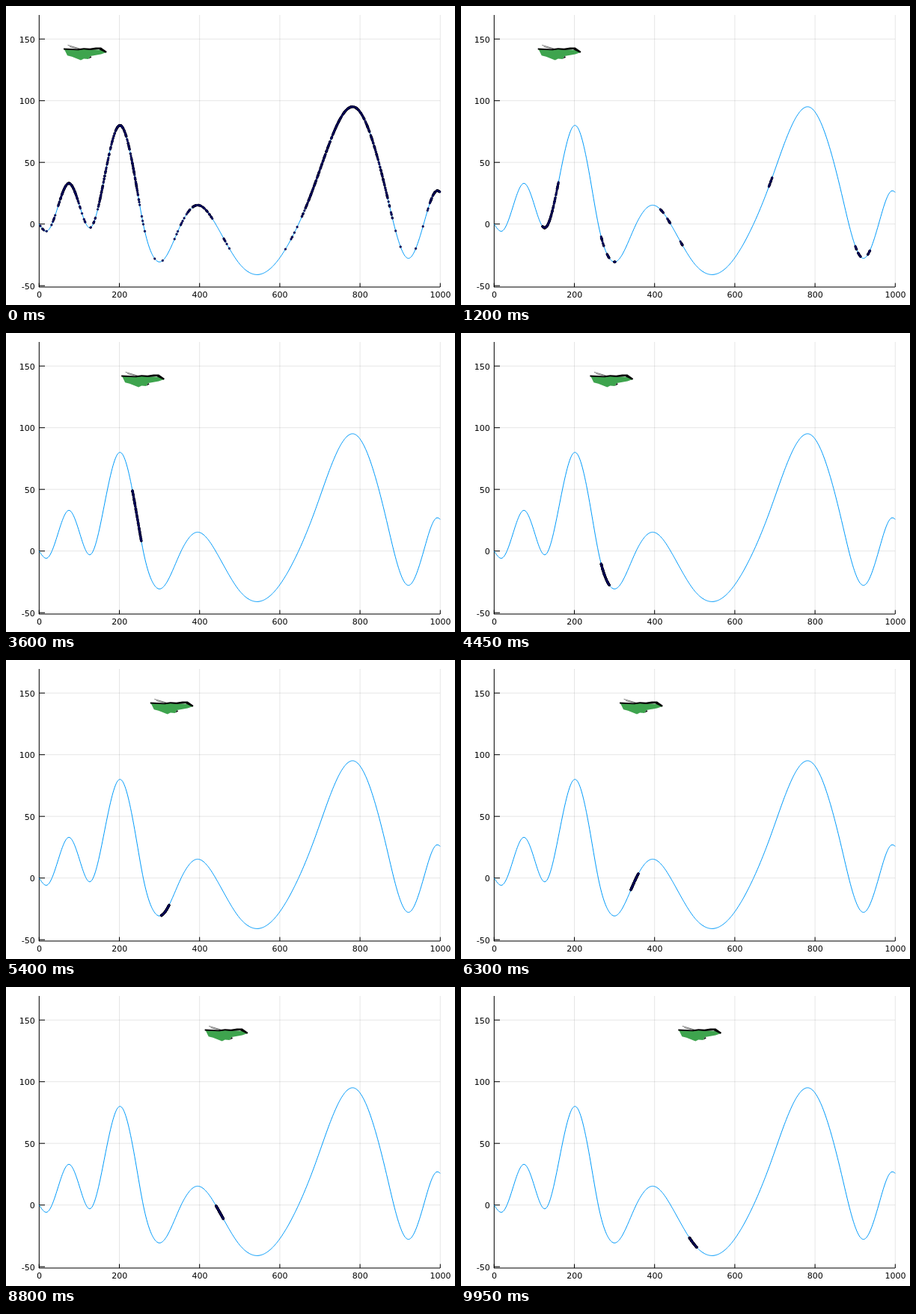
An HTML page for the animation above (10000 ms loop, 600x400 px).

```html
<!DOCTYPE html>
<html lang="en">
<head>
<meta charset="utf-8">
<title>Terrain localisation</title>
<style>
html, body { margin: 0; width: 100%; height: 100%; overflow: hidden; background: #fff; }
svg { display: block; width: 600px; height: 400px; }
text { font: 11px "DejaVu Sans", sans-serif; fill: #000; }
</style>
</head>
<body>
<svg viewBox="0 0 600 400">
  <g id="grid" stroke="#000" stroke-opacity=".1"></g>
  <g id="axes" stroke="#000"></g>
  <g id="labels"></g>
  <path id="ground" fill="none" stroke="#009afa"/>
  <g id="dots" fill="#000080" stroke="#000" stroke-width=".45"></g>
  <g id="plane">
    <path fill="#3ea44e" d="M78 58L112 58L130 59L134 62L127 64.5L113 67L110 71L104 70.4L100 72.5L88 67.7L82 66.3Z"/>
    <path d="M77 56.6L95 57.4L104 56.2L112 56.8L120 55.4L127 55.6L134.8 61L133.5 62.8L124 58L112 59L104 58.2L97 59.2L77 58.6Z"/>
    <path d="M113 67L114.4 68.5L110.5 70.8Z"/>
    <path fill="none" stroke="#222" stroke-width=".6" d="M82.5 52.3L99 57.3M85 54.6L98 57.6"/>
  </g>
</svg>
<script>
const NS = "http://www.w3.org/2000/svg";
const $ = id => document.getElementById(id);
function add(parent, tag, attrs) {
  const el = document.createElementNS(NS, tag);
  for (const k in attrs) el.setAttribute(k, attrs[k]);
  return $(parent).appendChild(el);
}
const line = (parent, x1, y1, x2, y2) => add(parent, "line", { x1, y1, x2, y2 });

const SCALE = 0.536;
const px = x => 44.3 + x * SCALE;
const py = y => 291.7 - y * 1.65;

function seeded(seed) {
  return () => {
    seed = (seed + 0x6d2b79f5) | 0;
    let t = Math.imul(seed ^ (seed >>> 15), 1 | seed);
    t = (t + Math.imul(t ^ (t >>> 7), 61 | t)) ^ t;
    return ((t ^ (t >>> 14)) >>> 0) / 4294967296;
  };
}

// Natural cubic spline through a few points
function spline(pts) {
  const n = pts.length, m = Array(n).fill(0), c = [0], d = [0];
  for (let i = 1; i < n - 1; i++) {
    const [x0, y0] = pts[i - 1], [x1, y1] = pts[i], [x2, y2] = pts[i + 1];
    const a = x1 - x0, b = x2 - x1;
    const w = 2 * (a + b) - a * c[i - 1];
    c[i] = b / w;
    d[i] = (6 * ((y2 - y1) / b - (y1 - y0) / a) - a * d[i - 1]) / w;
  }
  for (let i = n - 2; i > 0; i--) m[i] = d[i] - c[i] * m[i + 1];
  return x => {
    let i = 0;
    while (i < n - 2 && x > pts[i + 1][0]) i++;
    const [x0, y0] = pts[i], [x1, y1] = pts[i + 1], h = x1 - x0;
    const u = (x1 - x) / h, v = (x - x0) / h;
    return u * y0 + v * y1 + ((u ** 3 - u) * m[i] + (v ** 3 - v) * m[i + 1]) * h * h / 6;
  };
}

// Peaks, valleys and one or two points on each slope
const height = spline([
  [0, 0], [20, -5.7], [47, 14.2], [74, 33], [101, 14.6], [127, -3], [160, 33.2], [201, 80],
  [242, 32], [261, -2.3], [283.5, -25.7], [301, -30.7], [350, -2.8], [394, 15.3],
  [441, -0.6], [498, -31.6], [545, -41], [628, -12.3], [688, 33], [787, 94.7],
  [866, 25], [884, 0.4], [921, -27.8], [960, 1.6], [993, 27], [1000, 25.7]
]);

// Axes, grid and labels
for (let x = 0; x <= 1000; x += 200) {
  line("grid", px(x), 12, px(x), 376);
  line("axes", px(x), 376, px(x), 370.6);
  add("labels", "text", { x: px(x) + 0.2, y: 390, "text-anchor": "middle" }).textContent = x;
}
for (let y = -50; y <= 150; y += 50) {
  line("grid", 44, py(y), 580, py(y));
  line("axes", 44, py(y), 52, py(y));
  add("labels", "text", { x: 38.8, y: py(y) + 4.5, "text-anchor": "end" }).textContent = y;
}
line("axes", px(0), 12, px(0), 376);
line("axes", 44, 376, 580, 376);

let path = "";
for (let x = 0; x <= 1000; x += 2) {
  path += (x ? "L" : "M") + px(x).toFixed(2) + " " + py(height(x)).toFixed(2);
}
$("ground").setAttribute("d", path);

const SPEED = 2, START = 98;

// Starting cloud: dense on high ground, sparse in the valleys.
// A particle lasts while its ground resembles that under the plane.
const rnd = seeded(7);
const cloud = [];
for (let i = 0; i < 2200; i++) {
  const x = rnd() * 1000;
  if (rnd() > 0.12 * Math.exp(height(x) / 11)) continue;
  let left = -2 * Math.log(rnd()), life = 0;
  while (left > 0 && life < 21) {
    const s = SPEED * ++life;
    left -= ((height(Math.min(1000, x + s)) - height(START + s)) / 50) ** 2;
  }
  cloud.push({ x, life });
}

// Rival guesses, by starting place; wider ones live longer
const rivals = [222, 236, 252, 370, 387, 419, 641, 854, 862, 886].map(x => {
  const half = 1 + 4 * rnd();
  return { x, half, last: 27 + 2.5 * half };
});

function positions(n) {
  if (!n) return cloud.map(p => p.x);
  const r = seeded(n * 977), out = [], shift = SPEED * n;
  const scatter = (centre, half, count) => {
    for (let i = 0; i < count; i++) out.push(centre + shift + half * (2 * r() - 1));
  };
  for (const p of cloud) if (p.life > n) scatter(p.x, 1, 1);
  for (const g of rivals) if (n <= g.last) scatter(g.x, g.half, 3 + 3 * g.half);
  // The true cluster narrows and swings into place
  const half = 9.3 + 25 * Math.exp(-n / 28);
  const swing = -20 * Math.exp(-n / 30) * Math.cos(n / 26);
  scatter(START + swing, half, 120);
  return out;
}

const pool = [];
let shown = -1;
function draw(n) {
  if (n === shown) return;
  shown = n;
  const xs = positions(n).filter(x => x >= 0 && x <= 1000);
  while (pool.length < xs.length) pool.push(add("dots", "circle", { r: 1.35 }));
  pool.forEach((dot, i) => {
    const on = i < xs.length;
    dot.setAttribute("display", on ? "inline" : "none");
    if (!on) return;
    dot.setAttribute("cx", px(xs[i]).toFixed(2));
    dot.setAttribute("cy", py(height(xs[i])).toFixed(2));
  });
  $("plane").setAttribute("transform", `translate(${(n * SPEED * SCALE).toFixed(3)} 0)`);
}

const begin = performance.now();
function tick() {
  draw(Math.floor((performance.now() - begin) / 50) % 200);
  requestAnimationFrame(tick);
}
draw(0);
requestAnimationFrame(tick);
</script>
</body>
</html>
```
